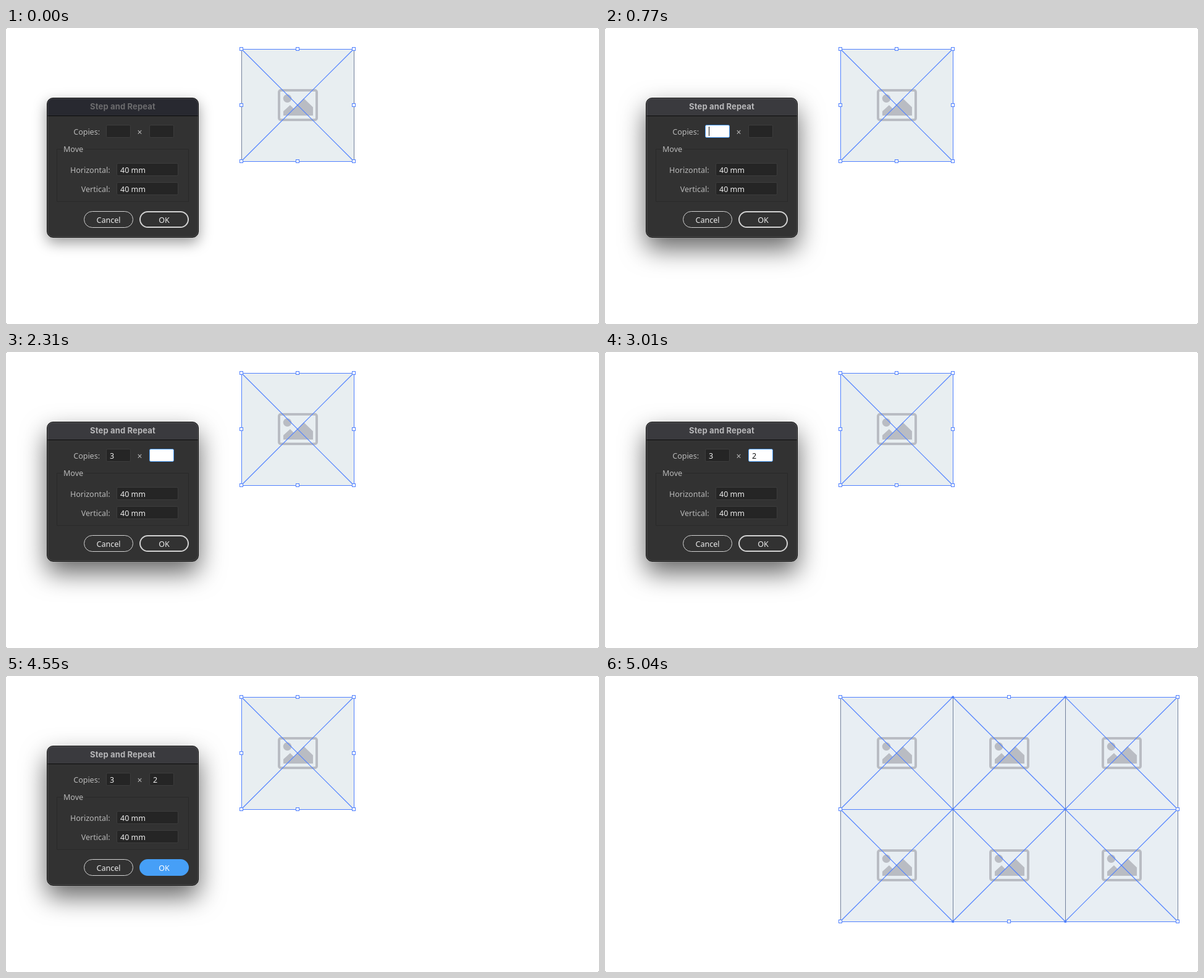
An HTML page for the animation above (6.3 s loop, 960 by 480 pixels).

```html
<!DOCTYPE html>
<html lang="en">
<head>
<meta charset="utf-8">
<title>Step and Repeat</title>
<style>
  html, body { margin: 0; width: 100%; height: 100%; overflow: hidden; background: #777; }
  #stage { position: relative; width: 960px; height: 480px; border-radius: 2px; background: #fff; overflow: hidden; }
  svg { position: absolute; left: 0; top: 0; }
  #shell {
    position: absolute; left: 66px; top: 113px; width: 246px; height: 227px; box-sizing: border-box;
    border: 1px solid #0c0c0c; border-radius: 10px;
    background: linear-gradient(var(--bar) 28px, #0c0c0c 28px 29px, #323232 29px);
    box-shadow: inset 0 0 0 1px #ffffff24, var(--shadow);
    --bar: #282930; --shadow: 0 8px 22px #0006;
  }
  #shell.active { --bar: #3a3a3e; --shadow: 0 18px 40px #0009; }
  text { font: 12.5px "Noto Sans", sans-serif; fill: #b9b9b9; }
  .bright { fill: #ececec; }
  #title { font: 700 13px Inter, sans-serif; letter-spacing: .15px; fill: #6c6c6e; }
  .active #title { fill: #b8b8ba; }
  .field rect { fill: #252525; stroke: #3d3d3d; }
  .field text { fill: #ececec; }
  .field.focus rect { fill: #fff; stroke: #4a9cf5; }
  .field.focus text { fill: #111; }
  .button rect { fill: none; stroke: #d2d2d2; }
  .button text { fill: #ececec; text-anchor: middle; }
  #ok rect { stroke-width: 2; }
  #ok.hover rect { fill: #d2d2d2; }
  #ok.hover text { fill: #323232; }
  #ok.press rect { fill: #469ff7; stroke: #469ff7; }
  #ok.press text { fill: #fff; }
  #art { --side: #4f80ff; --paper: #e8eef1; }
  #art.grey { --side: #72809b; }
  #art.many { --paper: #e8eef3; }
  .blue { fill: none; stroke: #4f80ff; }
  .side { stroke: var(--side); }
  .handle { fill: #fff; stroke: #4f80ff; }
</style>
</head>
<body>
<div id="stage">
  <div id="shell"></div>
  <svg width="960" height="480">
    <defs>
      <g id="cell">
        <path d="M0 0h182.5v182.5H0z" fill="var(--paper)"/>
        <g fill="#b9bcc3">
          <rect x="61" y="67" width="61" height="48" rx="3" fill="none" stroke="#b9bcc3" stroke-width="4"/>
          <circle cx="74.5" cy="80.2" r="6.7"/>
          <path d="M68 108v-7l11-10 6 6 16-17 15 14.500v13.500z"/>
        </g>
        <path class="side" d="M.5 0v182.500M182.500 0v182.500"/>
        <path class="blue" d="M0 .5h182.500M0 182.500h182.500"/>
        <path class="blue" stroke-width="1.2" d="M0 0L182 182M182 0L0 182"/>
      </g>
    </defs>
    <g id="art"></g>
    <g id="dialog"></g>
  </svg>
</div>
<script>
const $ = id => document.getElementById(id);
const LOOP = 6300, CELL = 182, LEFT = 381, TOP = 34;

const label = (x, y, text, attrs = '') => `<text x="${x}" y="${y}" ${attrs}>${text}</text>`;

const field = (id, x, y, width, value = '') =>
  `<g id="${id}" class="field"><rect x="${x + .5}" y="${y + .5}" width="${width - 1}" height="20" rx="2"/>` +
  label(x + 6, y + 16, value) + '</g>';

const button = (id, x, text, line) =>
  `<g id="${id}" class="button"><rect x="${x + line / 2}" y="${297 + line / 2}" ` +
  `width="${80 - line}" height="${27 - line}" rx="${(27 - line) / 2}"/>${label(x + 40, 316, text)}</g>`;

$('dialog').innerHTML =
  label(189, 132, 'Step and Repeat', 'id="title" text-anchor="middle"') +
  label(152, 173, 'Copies:', 'text-anchor="end"') +
  label(216.5, 174, '×', 'text-anchor="middle" style="font-size:14px"') +
  '<path d="M92 196.500H82.500v85h213v-85H128" fill="none" stroke="#292929"/>' +
  label(93, 201, 'Move') +
  label(168.5, 235, 'Horizontal:', 'text-anchor="end"') +
  label(168.5, 266, 'Vertical:', 'text-anchor="end"') +
  field('columns', 162, 157, 40) + field('rows', 232, 157, 40) +
  field('horizontal', 179, 219, 100, '40 mm') + field('vertical', 179, 250, 100, '40 mm') +
  button('cancel', 126, 'Cancel', 1) + button('ok', 216, 'OK', 2) +
  '<rect id="caret" y="160" width="1" height="15" fill="#111"/>';

function drawArt(columns, rows) {
  const right = LEFT + columns * CELL, bottom = TOP + rows * CELL;
  const middle = (LEFT + right) / 2, center = (TOP + bottom) / 2;
  let out = '';
  for (let r = 0; r < rows; r++)
    for (let c = 0; c < columns; c++)
      out += `<use href="#cell" x="${LEFT + c * CELL}" y="${TOP + r * CELL}"/>`;
  for (let c = 1; c < columns; c++)
    for (let r = 0; r <= rows; r++)
      out += `<rect x="${LEFT + c * CELL - 1.5}" y="${TOP + r * CELL - 1.5}" width="3.500" height="3.500" fill="#4f80ff"/>`;
  for (const x of [LEFT, middle, right])
    for (const y of [TOP, center, bottom])
      if (x !== middle || y !== center)
        out += `<rect class="handle" x="${x - 2.5}" y="${y - 2.5}" width="5" height="5"/>`;
  $('art').innerHTML = out;
}

function caretX(t) {
  if (t < 700 || t >= 4550) return 0;
  if (t < 1260) return 168;
  if (t < 1680) return 175;
  if (t < 2310) return 238;
  const on = (t >= 2450 && t < 3010) || (t >= 3570 && t < 4200);
  return on ? 245 : 0;
}

let copied = null;

function render(t) {
  const active = t >= 700, open = t < 4970, many = t >= 5040;
  $('shell').style.display = $('dialog').style.display = open ? '' : 'none';
  $('shell').classList.toggle('active', active);
  $('dialog').classList.toggle('active', active);

  $('columns').classList.toggle('focus', active && t < 1680);
  $('rows').classList.toggle('focus', t >= 1680 && t < 4550);
  $('columns').lastChild.textContent = t >= 1260 ? '3' : '';
  $('rows').lastChild.textContent = t >= 2450 ? '2' : '';
  $('ok').classList.toggle('hover', t >= 3150 && t < 4550);
  $('ok').classList.toggle('press', t >= 4550);

  const x = caretX(t);
  $('caret').setAttribute('x', x);
  $('caret').style.display = x ? '' : 'none';

  $('art').classList.toggle('grey', t < 140 || !open);
  $('art').classList.toggle('many', many);
  if (many !== copied) {
    copied = many;
    many ? drawArt(3, 2) : drawArt(1, 1);
  }
}

function frame() {
  render(performance.now() % LOOP);
  requestAnimationFrame(frame);
}
frame();
</script>
</body>
</html>
```
